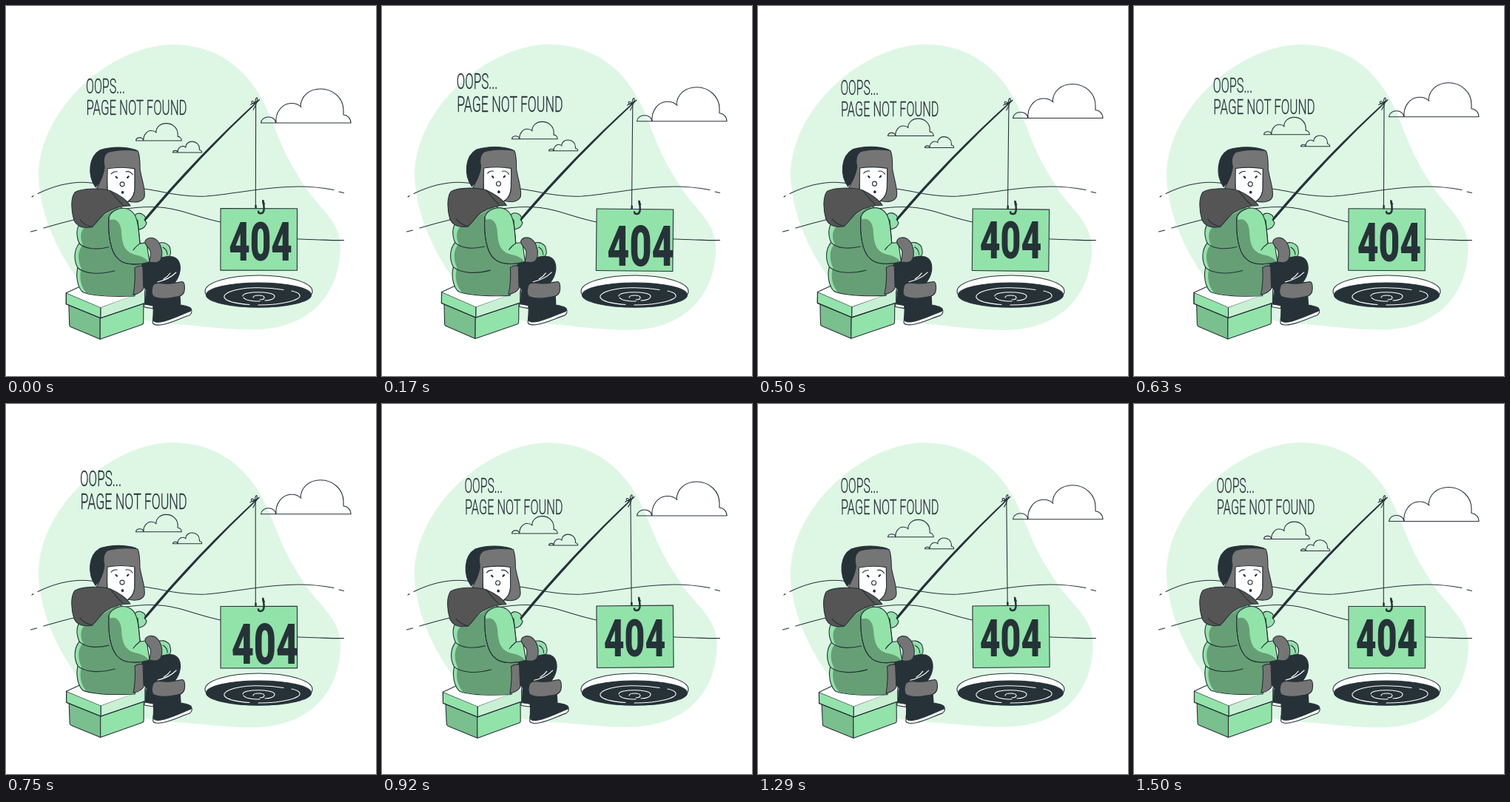
These frames come from a looping animation (500x500 px, 1540 ms). An HTML page:

```html
<!DOCTYPE html>
<html lang="en">
<head>
<meta charset="utf-8">
<title>Page not found</title>
<style>
  html, body { margin: 0; width: 100%; height: 100%; overflow: hidden; background: #fff; }
  svg { display: block; width: 100vw; height: 100vh; }
  path, circle, ellipse, rect { stroke: #263238; stroke-linecap: round; stroke-linejoin: round; }
  .line { fill: none; }
  .pale { fill: #def7e5; }
  .lid { fill: #c8f1d4; }
  .mint { fill: #92e3a9; }
  .sage { fill: #7abf8e; }
  .moss { fill: #669f76; }
  .fur { fill: #757575; }
  .hood { fill: #555; }
  .ink { fill: #263238; }
  .white { fill: #fff; }
  .bare { stroke: none; }
  .chalk { fill: none; stroke: #fff; }
  text { font-family: Roboto, sans-serif; fill: #263238; }
  .thin { font-size: 27.3px; font-weight: 300; stroke: #263238; stroke-width: .3; }
  .fat { font-size: 69.5px; font-weight: 800; text-anchor: middle; }
</style>
</head>
<body>
<svg viewBox="0 0 500 500" stroke-width="1.1">
  <defs>
    <path id="cloud" class="line" vector-effect="non-scaling-stroke"
      d="M20 0C20-4.500 16-8 10-8C5-8 .5-5 0 0H121.500C121.500-6 117-10.500 111.500-11V-17C111.500-33 98-46 80.500-46C66-46 54-37 53.500-22M54.500-21.500C51-25 46-26.800 40-26.500C28-26 19-13 20.500 0"/>
  </defs>

  <path id="blob" class="pale bare" d="M44 230C45 285 75 345 110 385C150 425 200 428 245 431C275 434 310 438 340 437C415 434 452 385 452 325C451 290 425 275 405 245C375 200 372 185 355 145C330 85 285 52 224 52C140 54 44 140 44 230Z"/>

  <g class="line">
    <path d="M35 258l2-1.500M43 253.500C65 243 90 236 115 239C150 243 180 245 205 250C232 256 250 258 270 257C310 254 350 244 395 244C415 244 430 246 443 248.500M450 251l6.500 1.500"/>
    <path d="M33.500 305l8-2M51 300C85 290 110 284 140 278C170 272 200 268 232 276C255 282 270 288 290 292C330 303 360 315 410 315.500C430 316 445 317 456.500 316.500"/>
  </g>

  <g id="clouds">
    <use href="#cloud" x="344.500" y="158.500"/>
    <use href="#cloud" transform="translate(175.500 182.500) scale(.508)"/>
    <use href="#cloud" transform="translate(225.500 198.500) scale(.322)"/>
  </g>

  <!-- ice hole -->
  <ellipse class="white" cx="341.500" cy="385.500" rx="72.500" ry="21.500"/>
  <ellipse class="ink" cx="341.500" cy="390.500" rx="71" ry="16.500"/>
  <path class="chalk" d="M375 383.500C350 379 318 380 303 386C286 393 296 401 329 403.500M341 404C375 404 399 397 397 391C396 388 391 386 386 385"/>
  <path class="chalk" d="M320 392C320 385 361 385 363 392C363 396 357 398 350 398M343 399C331 399 323 397 321 394"/>
  <path class="chalk" d="M334 394C334 390 349 390 349 394C349 396 346 397 343 397"/>

  <g id="angler">
    <!-- catch and line -->
    <rect class="mint" x="290" y="273.500" width="103.500" height="83.500"/>
    <path class="line" d="M337.300 133V270"/>
    <path class="line" stroke-width="2.500" d="M337.500 269.500v3M347.500 263C349.500 275 349 280 344 280C342 280 341 279 341 277.500"/>
    <path class="ink bare" d="M346 261l4.500 6.500-4 0Z"/>

    <!-- box -->
    <path class="sage" d="M85 401L86 431Q86 433 88 434L127.500 450.500V418Z"/>
    <path class="mint" d="M127.500 418V450.500L184 430.500Q186 430 186 427V398Z"/>
    <path class="lid" d="M128 407.500V422L188 401.500V385Z"/>
    <path class="mint" d="M81.500 388V403L128 422V407.500Z"/>
    <path class="white bare" d="M82 388L103 378L187.500 382V386L128 407.500Z"/>
    <path class="line" d="M103 378L81.500 388V403L128 422L188 401.500V383"/>

    <!-- far leg -->
    <path class="ink" d="M180 372L200 372L200 408L188 406L190 384Z"/>
    <path class="white" d="M187 403L199 405V409L187 407Z"/>

    <!-- near leg -->
    <path class="ink" d="M182 348C195 340 212 337 226 339C236 342 237 354 234 363C231 372 226 376 222 382L200 386L196 378L184 380Z"/>
    <path class="white" d="M199 421L198.500 428C199 431 205 432 212 430.500C225 428 238 421 248 418C251 416 252.500 412 250 409Z"/>
    <path class="ink" d="M200 392L199 424C200 428 206 428 214 426C228 422 240 416 250 412C252 408 248 406 236 404L235 388Z"/>
    <path class="fur" d="M198 380C199 374 205 374 213 375C222 376 230 374 238 372.500C242 373 242 381 241 386C239 392 234 393 226 394C216 396 207 396 200 393C196 390 197 384 198 380Z"/>
    <path class="chalk" d="M205 373C214 371 224 366 230 360M213 369C217 367 220 364 222 361"/>

    <!-- rod and far hand -->
    <path class="ink bare" d="M185.500 289Q257 203 342 125.500L343 126.500Q260 205 188 291Z"/>
    <path class="line" d="M340 128L330 133M336 130C329 124 331 136 337 130C336 123 341 121 339 128C338 133 336 137 334 140"/>
    <path class="mint" d="M174 284C175 280 181 279 185 282C189 284 189 287 187 289L190 293C189 298 185 301 181 302L176 302Z"/>

    <!-- coat -->
    <path class="mint" d="M100 294C95 301 95 311 99 321C91 331 92 345 97 354C94 366 97 381 104 387C120 393 150 393 174 392L184 348L178 290L150 268Z"/>
    <path class="moss bare" d="M112 296C99 301 100 314 104 323C96 331 97 345 102 355C98 367 102 381 109 388C126 392.500 150 392.500 173.500 391.500L183 348L176 290L150 272Z"/>
    <path class="line" d="M99 321C107 329 123 330 139 326M97 354C106 362 126 364 147 358"/>
    <path class="fur" d="M174 354C178 351 182 351 185 352L186 382C184 386 178 389 172 390.500C174 380 175 367 174 354Z"/>

    <!-- near arm -->
    <path class="mint" d="M203 323C208 318 216 319 221 325C223 331 223 336 221 338C214 339 210 340 204 342Z"/>
    <path class="line" d="M212 326C216 328 218 331 218 336"/>
    <path class="mint" d="M139 286C142 276 158 269 169 277C179 284 179 302 181 321L190 320L194 346C181 350 162 351 153 343C140 333 138 306 139 286Z"/>
    <path class="moss bare" d="M139.500 290C148 286 155 292 156 305C157 324 161 334 178 337C186 339 190 342 193 346C181 349.500 162 350.500 153.500 342.500C141 333 139 306 139.500 290Z"/>
    <path class="line" d="M139 286C138 306 140 333 153 343C162 351 181 350 194 346M181 321C177 324 174 327 172 330"/>
    <path class="fur" d="M188 318C190 313 197 312 202 315C210 321 213 334 209 343C206 348 200 347 195 346.500C192 345 197 338 195 331C193 326 187 323 188 318Z"/>

    <!-- hat, face, hood -->
    <path class="ink" d="M121 245C110 230 111 204 127 195C142 190 162 190 176 195L140 222Z"/>
    <path class="white" d="M135.500 216H174V247C173 259 166 267 157 267C146 266 138 258 137 248Z"/>
    <path class="fur" d="M137 198C149 194 166 194 178 196C181 202 181 213 181 221C183 234 189 249 187 258C184 266 173 266 165 264C171 260 174 254 174 246V220C162 218 149 218 137 220L136.500 250L122 248C126 239 132 230 133 218C131 210 132 202 137 198Z"/>
    <path class="hood" d="M93 252C103 246 130 246 141 250C152 255 163 262 168 270C155 270 145 273 136 279C127 284 123 294 116 299C105 301 96 298 92 290C88 277 87 260 93 252Z"/>
    <path class="line" d="M141 250C149 260 153 265 158 269M117 299C108 297 103 293 100 289"/>
    <path class="line" d="M142 227C144 224.500 147 223.500 150 224M162 224C166 223 169 225 171 228"/>
    <path class="line" stroke-width="2.200" d="M148.500 231l1.500 1.500M164 232l1.500-1.500"/>
    <circle class="white" cx="157" cy="241" r="3"/>
    <circle class="ink bare" cx="157.500" cy="252" r="1.900"/>
  </g>

  <g id="words">
    <text class="thin" transform="translate(111.500 120.300) scale(.575 1)">OOPS...</text>
    <text class="thin" transform="translate(244.500 148.700) scale(.598 1)" text-anchor="end">PAGE NOT FOUND</text>
    <text class="fat" transform="translate(341.500 341.300) scale(.69 1)">404</text>
  </g>
</svg>
<script>
  const LOOP = 1540, LEAD = 40;
  const [blob, clouds, angler, words] =
    ['blob', 'clouds', 'angler', 'words'].map(id => document.getElementById(id));

  const sway = [[0, 0], [.25, 1], [.75, -1], [1, 0]];
  const float = [[0, 0], [.5, -10], [1, 0]];
  const beat = [[0, 1], [.1, 1.1], [.3, 1], [.4, 1], [.5, 1.1], [.6, 1], [1, 1]];

  // Linear interpolation through [progress, value] keys
  function at(keys, p) {
    const i = keys.findIndex(key => key[0] > p);
    const [p0, v0] = keys[i - 1], [p1, v1] = keys[i];
    return v0 + (v1 - v0) * (p - p0) / (p1 - p0);
  }

  const move = (el, value) => el.setAttribute('transform', value);

  function draw() {
    const p = (performance.now() + LEAD) % LOOP / LOOP;
    const angle = at(sway, p);
    move(blob, `rotate(${angle} 248 245)`);
    move(angler, `rotate(${angle} 237 288)`);
    move(clouds, `translate(0 ${at(float, p)})`);
    move(words, `translate(244 224) scale(${at(beat, p)}) translate(-244 -224)`);
    requestAnimationFrame(draw);
  }
  draw();
</script>
</body>
</html>
```
